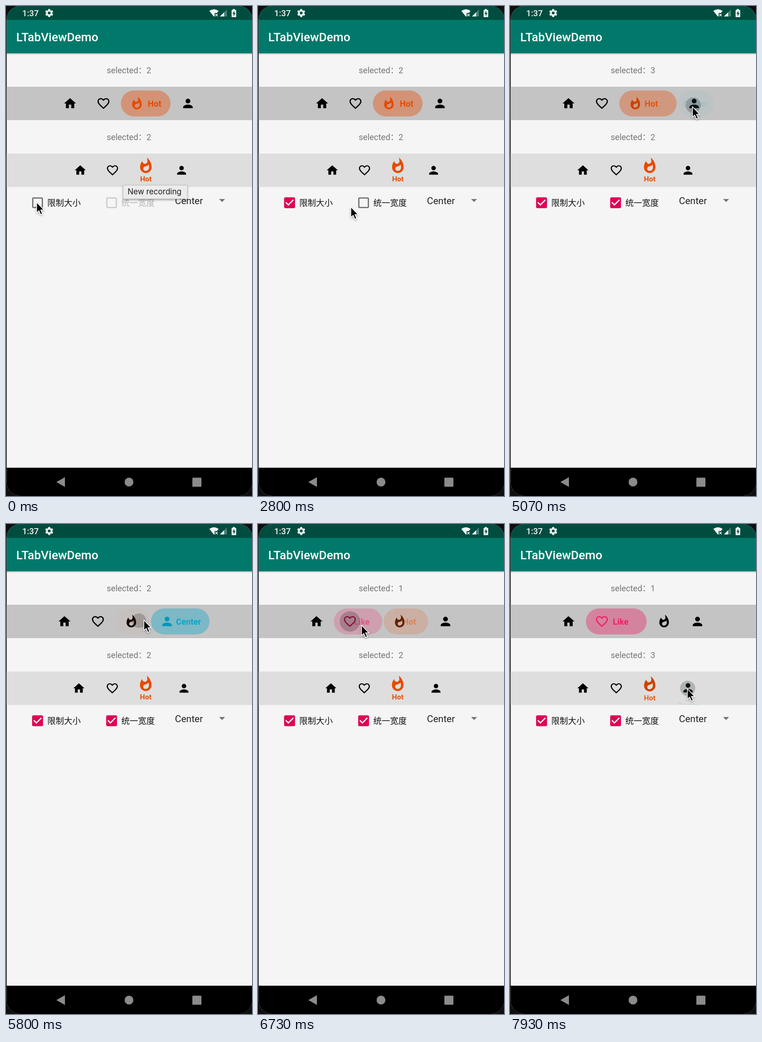
Recreate the animation shown at these times as an HTML page. Size 530 px wide and 1056 px high, loop 8000 ms.

```html
<!DOCTYPE html>
<html lang="zh-CN">
<head>
<meta charset="utf-8">
<title>LTabViewDemo</title>
<style>
  html, body { margin: 0; width: 100%; height: 100%; overflow: hidden; background: #0e0e0e; }
  svg { display: block; width: 100%; height: 100%; }
  text { font-family: Roboto, "Noto Sans CJK SC", "Noto Sans CJK", sans-serif; white-space: pre; }
  .note { font-size: 18px; fill: #757575; text-anchor: middle; }
  .label { font-weight: 700; }
  .option { font-size: 18px; }
  .tip { font: 16.7px Inter, sans-serif; fill: #1c1c1c; }
</style>
</head>
<body>
<svg viewBox="0 0 530 1056" xmlns="http://www.w3.org/2000/svg">
  <defs>
    <clipPath id="screen"><rect x="1.5" y="0" width="529" height="1056" rx="29"/></clipPath>
    <clipPath id="lowRow"><rect y="318" width="530" height="72"/></clipPath>
    <linearGradient id="shade" x2="0" y2="1">
      <stop offset="0" stop-opacity=".2"/><stop offset="1" stop-opacity="0"/>
    </linearGradient>
    <filter id="soft" x="-50%" y="-50%" width="200%" height="200%">
      <feDropShadow dx="0" dy="2" stdDeviation="2" flood-opacity=".35"/>
    </filter>
  </defs>
  <g clip-path="url(#screen)">
    <rect width="530" height="1056" fill="#f5f5f5"/>
    <rect width="530" height="30" fill="#004d40"/>
    <rect y="30" width="530" height="72" fill="#00796b"/>
    <rect y="102" width="530" height="4" fill="url(#shade)"/>
    <rect y="174" width="530" height="72" fill="#c4c4c4"/>
    <rect y="318" width="530" height="72" fill="#dedede"/>
    <rect y="995" width="530" height="61" fill="#000"/>

    <g fill="#fff" opacity=".95">
      <text x="35" y="21.5" font-size="18" font-weight="500">1:37</text>
      <path transform="translate(82.8 4.8) scale(.86)" fill-rule="evenodd" d="M19.4 13a7.5 7.5 0 0 0 0-2l2.1-1.6c.2-.2.2-.4.1-.6l-2-3.5c-.1-.2-.4-.3-.6-.2l-2.5 1a7.3 7.3 0 0 0-1.7-1l-.4-2.6a.5.5 0 0 0-.5-.5h-4a.5.5 0 0 0-.5.5L9 5.100a7.300 7.300 0 0 0-1.700 1l-2.500-1c-.2-.1-.5 0-.6.2l-2 3.500c-.1.2-.1.4.1.6L4.500 11a7.500 7.500 0 0 0 0 2l-2.100 1.600c-.2.2-.2.4-.1.6l2 3.500c.1.2.4.3.6.2l2.500-1a7.300 7.300 0 0 0 1.700 1l.4 2.600c0 .3.2.5.5.5h4c.3 0 .5-.2.5-.5l.4-2.600a7.300 7.300 0 0 0 1.700-1l2.500 1c.2.1.5 0 .6-.2l2-3.500c.1-.2.1-.4-.1-.6ZM12 15.500a3.500 3.500 0 1 1 0-7 3.500 3.500 0 0 1 0 7Z"/>
      <path d="M438 10.500Q448 3.500 458 10.500L454.500 15H449.500V21.500L448 23Z"/>
      <path d="M451 17l5 5m0-5l-5 5" stroke="#fff" stroke-width="1.500"/>
      <path d="M461 22.500L476 7.500V22.500Z" opacity=".3"/>
      <path d="M461 22.500L470 13.500V22.500Z"/>
      <path d="M486 9.500q0-1 1-1h1.700V6.500h4.200v2H495q1 0 1 1V23q0 1-1 1h-8q-1 0-1-1Z"/>
      <path d="M492 10.500l-4 6.500h2.500v5l4-6.700H492Z" fill="#004d40"/>
    </g>
    <text x="22" y="76" font-size="25.7" font-weight="500" fill="#fff">LTabViewDemo</text>
    <text class="note" id="topNote" x="265" y="145"></text>
    <text class="note" id="lowNote" x="265" y="289"></text>

    <g id="topTabs"></g>
    <g id="lowTabs" clip-path="url(#lowRow)"></g>
    <g id="boxes"></g>

    <text x="364" y="427" font-size="20.570" fill="#212121">Center</text>
    <path d="M459 416h13l-6.500 6.500Z" fill="#757575"/>

    <g fill="#8b8b8b">
      <path d="M108.500 1026L127 1015.500V1036.500Z"/>
      <circle cx="265" cy="1026" r="9.500"/>
      <rect x="401.500" y="1016.500" width="19.500" height="19.500" rx="1.500"/>
    </g>
  </g>
  <g id="tooltip">
    <rect x="252.500" y="386.500" width="138" height="29" fill="#ececec" stroke="#c6c6c6" filter="url(#soft)"/>
    <text class="tip" x="262" y="406">New recording</text>
  </g>
  <path id="cursor" filter="url(#soft)" fill="#000" stroke="#fff" stroke-width="1.500" stroke-linejoin="round"
        d="M0 0V22.500L5 18L8.800 26.500L12.500 25L8.800 16.500H15.800Z"/>
</svg>
<script>
const LOOP = 8000, FPS = 15, MORPH = 300;
const ICON = {
  home: 'M10 20v-6h4v6h5v-8h3L12 3 2 12h3v8z',
  heart: 'M16.5 3c-1.74 0-3.41.81-4.5 2.09C10.91 3.81 9.24 3 7.5 3 4.42 3 2 5.42 2 8.5c0 3.78 3.4 6.86 8.55 11.54L12 21.35l1.45-1.32C18.6 15.36 22 12.28 22 8.5 22 5.42 19.58 3 16.5 3zm-4.400 15.55l-.1.1-.1-.1C7.140 14.240 4 11.390 4 8.500 4 6.500 5.500 5 7.500 5c1.540 0 3.040.99 3.570 2.360h1.870C13.460 5.990 14.960 5 16.500 5c2 0 3.500 1.500 3.500 3.500 0 2.890-3.140 5.740-7.900 10.050z',
  flame: 'M13.5.67s.74 2.65.74 4.8c0 2.06-1.35 3.73-3.41 3.73-2.07 0-3.63-1.67-3.63-3.73l.03-.36C5.21 7.51 4 10.62 4 14c0 4.42 3.58 8 8 8s8-3.58 8-8C20 8.61 17.41 3.8 13.5.67zM11.71 19c-1.78 0-3.22-1.4-3.22-3.14 0-1.62 1.05-2.76 2.81-3.12 1.77-.36 3.6-1.21 4.62-2.58.39 1.29.59 2.65.59 4.04 0 2.65-2.15 4.8-4.8 4.8z',
  person: 'M12 12c2.21 0 4-1.79 4-4s-1.79-4-4-4-4 1.79-4 4 1.79 4 4 4zm0 2c-2.67 0-8 1.34-8 4v2h16v-2c0-2.66-5.33-4-8-4z',
  box: 'M19 5v14H5V5h14m0-2H5c-1.100 0-2 .9-2 2v14c0 1.100.9 2 2 2h14c1.100 0 2-.9 2-2V5c0-1.100-.9-2-2-2z',
  boxFull: 'M5 3h14q2 0 2 2v14q0 2-2 2H5q-2 0-2-2V5q0-2 2-2z',
  tick: 'M10 17l-5-5 1.410-1.410L10 14.170l7.590-7.590L19 8z'
};
const TABS = [
  { icon: 'home', name: '', rgb: [0, 0, 0], textWidth: 0 },
  { icon: 'heart', name: 'Like', rgb: [236, 34, 102], textWidth: 34 },
  { icon: 'flame', name: 'Hot', rgb: [230, 74, 0], textWidth: 30 },
  { icon: 'person', name: 'Center', rgb: [0, 164, 200], textWidth: 54 }
];
const LIMIT_AT = 1460, UNIFORM_AT = 3390;
const TOP_PICKS = [[-1000, 2], [5000, 3], [5745, 2], [6570, 1]];
const LOW_PICKS = [[-1000, 2], [7870, 3]];
const CURSOR = [
  [0, 66, 423], [2130, 66, 423], [2800, 200, 433], [3070, 223, 425], [3870, 223, 425],
  [4900, 393, 217], [5250, 393, 217], [5700, 297, 207], [5900, 297, 207],
  [6500, 223, 218], [6850, 223, 218], [7800, 382, 355], [LOOP, 382, 355]
];

const byId = id => document.getElementById(id);
const clamp = v => Math.max(0, Math.min(1, v));
const ease = v => (1 - Math.cos(Math.PI * clamp(v))) / 2;
const mix = (a, b, p) => a + (b - a) * p;

function add(parent, tag, attrs = {}, text = '') {
  const node = document.createElementNS('http://www.w3.org/2000/svg', tag);
  set(node, attrs);
  node.textContent = text;
  return parent.appendChild(node);
}
function set(node, attrs) {
  for (const key in attrs) node.setAttribute(key, attrs[key]);
}
const placeIcon = (x, y, scale) => `translate(${x} ${y}) scale(${scale}) translate(-12 -12)`;
const tint = (rgb, p) => `rgb(${rgb.map(c => Math.round(c * p))})`;

function buildTabs(parent, fontSize, anchor) {
  return TABS.map(tab => {
    const fill = `rgb(${tab.rgb})`;
    return {
      ...tab,
      pill: add(parent, 'rect', { y: 182, height: 56, rx: 28, fill, opacity: 0 }),
      ripple: add(parent, 'circle', { r: 0 }),
      label: add(parent, 'text', { class: 'label', fill, 'font-size': fontSize, 'text-anchor': anchor }, tab.name),
      glyph: add(parent, 'path', { d: ICON[tab.icon] })
    };
  });
}

function buildBox(x, caption) {
  const parent = byId('boxes'), transform = placeIcon(x, 424, 1.286);
  const ripple = add(parent, 'circle', { cx: x, cy: 424, r: 25.7, fill: '#e20054', opacity: 0 });
  const frame = add(parent, 'path', { d: ICON.box, transform, fill: '#6c6c6c' });
  const full = add(parent, 'g', { transform });
  add(full, 'path', { d: ICON.boxFull, fill: '#e20054' });
  add(full, 'path', { d: ICON.tick, fill: '#fff' });
  const text = add(parent, 'text', { class: 'option', x: x + 21, y: 430.5 }, caption);
  return { ripple, frame, full, text };
}

const topTabs = buildTabs(byId('topTabs'), 18, 'start');
const lowTabs = buildTabs(byId('lowTabs'), 15.43, 'middle');
const limitBox = buildBox(68, '限制大小');
const uniformBox = buildBox(227.5, '统一宽度');

function selection(picks, t) {
  const k = picks.findLastIndex(pick => pick[0] <= t);
  const [start, index] = picks[k];
  const p = ease((t - start) / MORPH);
  const weights = TABS.map((_, i) => i === index ? p : 0);
  if (k > 0) weights[picks[k - 1][1]] = 1 - p;
  return { index, weights, age: t - start };
}

function drawRipple(tab, active, age, x, y, from) {
  const pull = clamp(age / 140);
  set(tab.ripple, {
    cx: mix(from.x, x, pull), cy: mix(from.y, y, pull),
    r: Math.min(22, 10 + age * .1),
    opacity: active ? .2 * clamp((460 - age) / 220) : 0
  });
}

function drawTop(t, from) {
  const { index, weights, age } = selection(TOP_PICKS, t);
  const uniform = t >= UNIFORM_AT;
  const widths = topTabs.map((tab, i) => mix(69, uniform ? 131 : 77 + tab.textWidth, weights[i]));
  let left = 265 - (widths.reduce((a, b) => a + b) + 9) / 2;
  topTabs.forEach((tab, i) => {
    const p = weights[i], x = left + 34.5;
    set(tab.pill, { x: left, width: widths[i], opacity: .4 * p });
    set(tab.label, { x: left + 58 - (1 - p) * tab.textWidth, y: 217, opacity: p });
    set(tab.glyph, { transform: placeIcon(x, 210, 1.286), fill: tint(tab.rgb, p) });
    drawRipple(tab, i === index, age, x, 210, from);
    left += widths[i] + 3;
  });
  byId('topNote').textContent = 'selected：' + index;
}

function drawLow(t, from) {
  const { index, weights, age } = selection(LOW_PICKS, t);
  const centers = t >= UNIFORM_AT ? [157, 229, 301, 383.5] : [160, 229.5, 301.3, 378.3];
  lowTabs.forEach((tab, i) => {
    const p = weights[i], x = centers[i], y = 354 - 9.5 * p;
    set(tab.label, { x, y: 378 + 20 * (1 - p), opacity: p });
    set(tab.glyph, { transform: placeIcon(x, y, 1.2 + .36 * p), fill: tint(tab.rgb, p) });
    drawRipple(tab, i === index, age, x, y, from);
  });
  byId('lowNote').textContent = 'selected：' + index;
}

function drawBox(box, checkedAt, enabledAt, t) {
  const enabled = t >= enabledAt, age = t - checkedAt;
  box.frame.setAttribute('fill', enabled ? '#6c6c6c' : '#cacaca');
  box.text.setAttribute('fill', enabled ? '#111' : '#b5b5b5');
  box.full.setAttribute('opacity', clamp(age / 130));
  box.ripple.setAttribute('opacity', age < 0 ? 0 : .14 * clamp(1 - age / 350));
}

function cursorAt(t) {
  const k = Math.max(1, CURSOR.findIndex(c => c[0] >= t));
  const [t0, x0, y0] = CURSOR[k - 1], [t1, x1, y1] = CURSOR[k];
  const p = ease((t - t0) / (t1 - t0));
  return { x: mix(x0, x1, p), y: mix(y0, y1, p) };
}

function draw(t) {
  const pointer = cursorAt(t);
  drawTop(t, pointer);
  drawLow(t, pointer);
  drawBox(limitBox, LIMIT_AT, 0, t);
  drawBox(uniformBox, UNIFORM_AT, LIMIT_AT, t);
  byId('tooltip').setAttribute('opacity', clamp(1 - (t - 533) / 333));
  byId('cursor').setAttribute('transform', `translate(${pointer.x} ${pointer.y})`);
}

const begin = performance.now();
function tick() {
  const elapsed = (performance.now() - begin) % LOOP;
  draw(Math.floor((elapsed + 5) * FPS / 1000) * 1000 / FPS % LOOP);
  requestAnimationFrame(tick);
}
tick();
</script>
</body>
</html>
```
